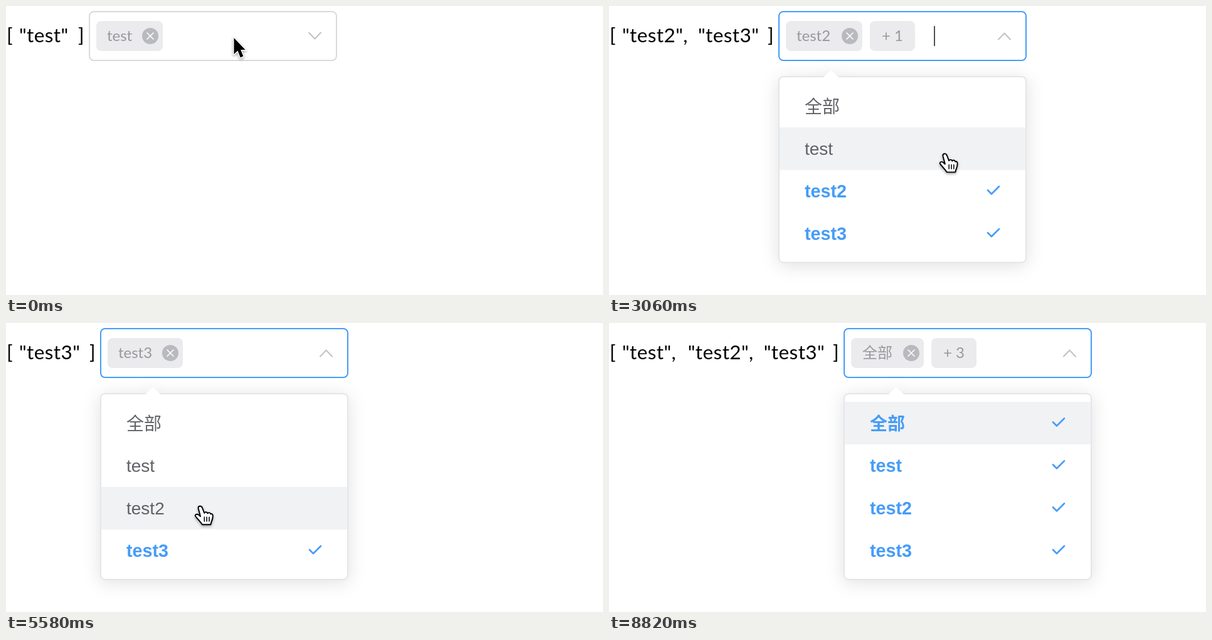
An HTML page that plays this animation: 952 px wide and 462 px high, repeating every 8880 ms.

```html
<!DOCTYPE html>
<html lang="en">
<head>
<meta charset="utf-8">
<title>Multi-select with a select-all option</title>
<style>
  html, body { margin: 0; width: 100%; height: 100%; overflow: hidden; background: #fff; }
  svg { display: block; width: 100%; height: 100%; }
  text { white-space: pre; }
  .model { font: 31.5px Lato, "Noto Sans CJK SC", sans-serif; fill: #000; letter-spacing: .4px; font-kerning: none; }
  .tag { font: 24px Lato, "Noto Sans CJK SC", "Noto Sans CJK", sans-serif; fill: #97999d; }
  .hint { font: 28px "Noto Sans CJK SC", "Noto Sans CJK", sans-serif; fill: #c0c4cc; }
  .option { font: 28px "Liberation Sans", "Noto Sans CJK SC", "Noto Sans CJK", sans-serif; fill: #606266; }
  .option.on { font-weight: 700; fill: #469cf8; }
  .option.on.latin { font-size: 28.7px; }
  .panel { filter: drop-shadow(0 4px 14px rgba(0, 0, 0, .12)); }
  .pointer { filter: drop-shadow(0 2px 2px rgba(0, 0, 0, .35)); }
</style>
</head>
<body>
<svg id="stage" viewBox="0 0 952 462" xmlns="http://www.w3.org/2000/svg"></svg>
<script>
const LOOP = 8880, STEP = 60, BLINK = 180, OPEN_AT = 240, OPEN_TIME = 150, POINTER_END = 8340;
const WIDTH = 396, ROW_TOP = 126, ROW_H = 68;
const ALL = '全部';
const OPTIONS = [ALL, 'test', 'test2', 'test3'];
const BLUE = '#469cf8';

// [time, selected values, start of caret blinking]
const STATES = [
  [0, ['test'], OPEN_AT],
  [1080, ['test', 'test2', 'test3'], 1200],
  [3000, ['test2', 'test3'], 3000],
  [3720, ['test3'], 3960],
  [4260, [], 4260],
  [5040, ['test3'], 5040],
  [5700, ['test3', 'test2'], 5700],
  [6240, ['test3', 'test2', 'test'], 6240],
  [7200, [], 7200],
  [7740, ['test', 'test2', 'test3'], 7740],
  [8280, ['test', 'test2', 'test3'], 8640]
];

// [time, x, y] of the pointer's hot spot
const PATH = [
  [0, 363, 50], [240, 363, 50], [480, 352, 90], [840, 334, 160], [1080, 330, 165],
  [1380, 325, 188], [1560, 325, 188], [1800, 300, 334], [2040, 345, 182],
  [2220, 620, 170], [2340, 555, 177], [2460, 555, 177], [2820, 541, 230],
  [3000, 538, 232], [3360, 522, 292], [3600, 520, 297], [3960, 520, 297],
  [4200, 438, 372], [4380, 438, 372], [4560, 442, 397], [4800, 405, 368],
  [5040, 400, 366], [5400, 325, 306], [5580, 311, 293], [5760, 311, 293],
  [6060, 418, 236], [6240, 422, 230], [6780, 399, 166], [7200, 396, 162], [8340, 396, 162]
];

const stateAt = t => STATES.filter(s => s[0] <= t).pop();
const pitch = name => name === 'test' ? 104.8 : 121;
const boxLeft = items => 2 * Math.round((28 + items.reduce((sum, s) => sum + pitch(s), 0)) / 2);

function pointerAt(t) {
  const i = PATH.findIndex(p => p[0] > t);
  if (i < 0) return PATH[PATH.length - 1].slice(1);
  const [t0, x0, y0] = PATH[i - 1], [t1, x1, y1] = PATH[i];
  const u = (t - t0) / (t1 - t0), k = u * u * (3 - 2 * u);
  return [x0 + (x1 - x0) * k, y0 + (y1 - y0) * k];
}

function rowUnder(t) {
  const [x, y] = pointerAt(t), left = boxLeft(stateAt(t)[1]);
  const row = Math.floor((y - ROW_TOP) / ROW_H);
  const inside = t > OPEN_AT && x > left && x < left + WIDTH && row >= 0 && row < OPTIONS.length;
  return inside ? row : -1;
}

// The last row pointed at stays highlighted after the pointer leaves.
const hovers = [];
for (let t = 0, last = -1; t < LOOP; t += STEP) {
  const row = rowUnder(t);
  if (row >= 0) last = row;
  hovers.push(last);
}

const text = (cls, x, y, s, extra = '') => `<text class="${cls}" x="${x}" y="${y}" ${extra}>${s}</text>`;
const rect = (x, y, w, h, fill, r = 0, extra = '') =>
  `<rect x="${x}" y="${y}" width="${w}" height="${h}" rx="${r}" fill="${fill}" ${extra}/>`;
const line = (d, color, width) =>
  `<path d="${d}" fill="none" stroke="${color}" stroke-width="${width}" stroke-linecap="round" stroke-linejoin="round"/>`;

function model(items, left) {
  let out = text('model', 1, 58, '['), x = 21;
  items.forEach((s, i) => {
    out += text('model', x, 58, `"${s}"${i < items.length - 1 ? ',' : ''}`);
    x += pitch(s);
  });
  return out + text('model', left - 7, 58, ']', 'text-anchor="end"');
}

function tags(items, left) {
  if (!items.length) return { svg: '', end: left };
  const full = items.length === 3;
  const label = full ? ALL : items[0];
  const width = { [ALL]: 116, test: 106, test2: 122, test3: 120 }[label];
  const x = left + 12, cx = x + width - 20;
  let end = x + width;
  let svg = rect(x, 24, width, 48, '#ebebed', 8)
    + text('tag', x + (full ? 18 : 17), 56, label)
    + `<circle cx="${cx}" cy="48" r="13" fill="#b8babe"/>`
    + line(`M${cx - 5} 43l10 10m0 -10l-10 10`, '#fff', 1.6);
  const more = full ? 3 : items.length - 1;
  if (more) {
    svg += rect(end + 12, 24, 72, 48, '#ebebed', 8) + text('tag', end + 31, 56, `+ ${more}`);
    end += 84;
  }
  return { svg, end };
}

function field(t, items, left, blinkStart) {
  const open = t >= OPEN_AT;
  const turn = Math.max(0, Math.min(1, (t - OPEN_AT + STEP) / OPEN_TIME));
  const chip = tags(items, left);
  let out = rect(left + 1, 9, WIDTH - 2, 78, '#fff', 7, `stroke="${open ? BLUE : '#d9dadd'}" stroke-width="2"`);
  out += chip.svg;
  if (!items.length) out += text('hint', left + 32, 58, '请选择');
  out += `<g transform="rotate(${180 * turn} ${left + 360.5} 48)">`
    + line(`M${left + 351} 42.5l9.5 10l9.5 -10`, '#c0c2c6', 2) + '</g>';
  const lit = t >= blinkStart && Math.floor((t - blinkStart) / BLINK) % 2 === 0;
  if (lit) out += rect(chip.end + 30, 32, 2, 32, '#505154');
  return out;
}

function menu(t, items, left) {
  if (t < OPEN_AT) return '';
  const k = Math.min(1, (t - OPEN_AT + STEP) / OPEN_TIME);
  const hover = hovers[t / STEP], tip = left + 84;
  let out = `<g opacity="${k}" transform="translate(0 ${112 * (1 - k)}) scale(1 ${k})"><g class="panel">`
    + rect(left + 1, 113, WIDTH - 2, 297, '#fff', 7, 'stroke="#e4e6ea" stroke-width="2"')
    + `<path d="M${tip - 13} 115l11 -11q2 -2 4 0l11 11z" fill="#fff"/></g>`;
  OPTIONS.forEach((name, i) => {
    const y = ROW_TOP + i * ROW_H;
    const on = i ? items.includes(name) : items.length === 3;
    const cls = 'option' + (on ? ' on' : '') + (i ? ' latin' : '');
    if (i === hover) out += rect(left + 2, y, WIDTH - 4, ROW_H, '#f1f2f4');
    out += text(cls, left + 42, y + (i ? 44 : 45), name);
    if (on) out += line(`M${left + 334} ${y + 32.5}l6 6l12 -12`, BLUE, 2.6);
  });
  return out + '</g>';
}

function pointer(t) {
  if (t >= POINTER_END) return '';
  const [x, y] = pointerAt(t);
  const hand = '<g transform="translate(-10.5 -2) scale(.96)">'
    + '<path d="M6.5 6C5.5 1.5 11 0 13 4.500L16.500 13.500C17 11 21 11 22 14C23 12 26 12 27 15C28.500 14 31 15 30.500 19C30.500 24 28 27 27 32.500L13 32.500C10 28 5 23 2 19C0 16 4 14 7 16.500L10 19Z" fill="#fff" stroke="#000" stroke-width="2" stroke-linejoin="round"/>'
    + line('M16.500 20v7m4 -7v7m4 -7v7', '#000', 1.6) + '</g>';
  const arrow = '<path transform="translate(.5 1) scale(.93)" d="M0 0V28L6.500 22L11 33.500L16 31.500L11.500 20.500H19.500Z" fill="#000" stroke="#fff" stroke-width="3" stroke-linejoin="round" paint-order="stroke"/>';
  return `<g class="pointer" transform="translate(${x} ${y})">${rowUnder(t) >= 0 ? hand : arrow}</g>`;
}

const stage = document.getElementById('stage');
const start = performance.now();
let shown = -1;

function draw() {
  const t = Math.floor(((performance.now() - start) % LOOP) / STEP) * STEP;
  if (t !== shown) {
    shown = t;
    const [, items, blinkStart] = stateAt(t), left = boxLeft(items);
    stage.innerHTML = model(items, left) + field(t, items, left, blinkStart) + menu(t, items, left) + pointer(t);
  }
  requestAnimationFrame(draw);
}
draw();
</script>
</body>
</html>
```
